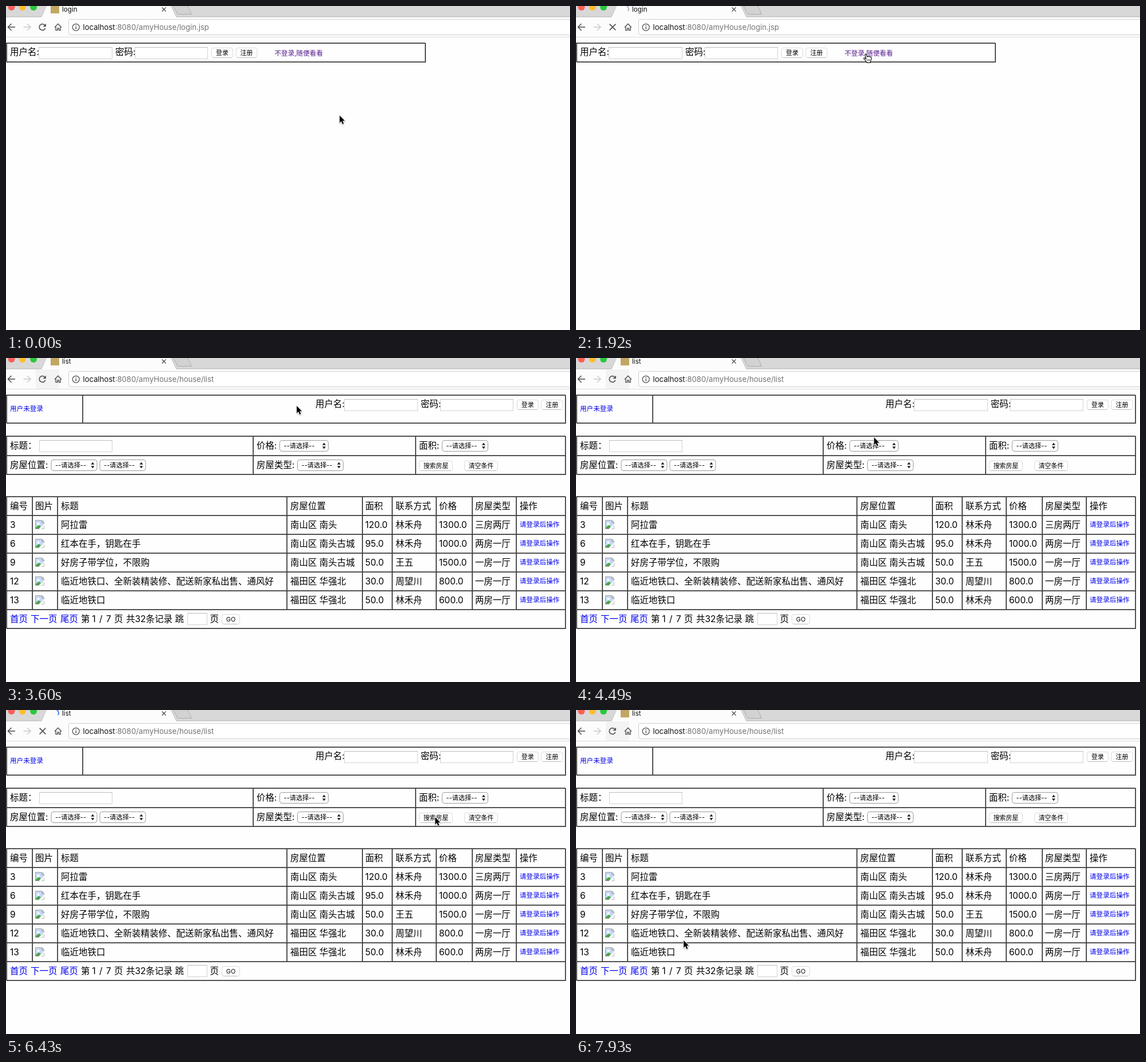
An HTML page with a canvas for the animation above (8 s loop, 986 px wide and 568 px high).

```html
<!DOCTYPE html>
<html lang="zh-CN">
<head>
<meta charset="utf-8">
<title>list</title>
<style>
  html, body { margin: 0; width: 100%; height: 100%; overflow: hidden; background: #fefefe; }
  canvas { display: block; }
</style>
</head>
<body>
<canvas id="stage" width="986" height="568"></canvas>
<script>
const ctx = document.getElementById('stage').getContext('2d');
const LOOP = 8000;
const FONT = 'Inter, "Noto Sans CJK SC", "Noto Sans CJK", sans-serif';
const LINK = '#0000ee', VISITED = '#551a8b';
const EDGE_LIGHT = '#787878', EDGE_DARK = '#2e2e2e';

// Pointer moves: first step, last step, number of steps, goal x, goal y
const START = [583, 191];
const MOVES = [
  [300, 1340, 8, 508, 83],
  [3750, 4640, 7, 524, 152],
  [4940, 5530, 5, 726, 200],
  [5830, 5980, 2, 750, 187],
  [7030, 7930, 7, 188, 403]
];

const COLUMNS = [1, 46, 90, 491, 623, 675, 752, 815, 892, 978];
const CELL_X = [7, 51, 96, 497, 628, 681, 757, 820, 898];
const HEADS = ['编号', '图片', '标题', '房屋位置', '面积', '联系方式', '价格', '房屋类型', '操作'];
const HOUSES = [
  ['3', '', '阿拉雷', '南山区 南头', '120.0', '林禾舟', '1300.0', '三房两厅'],
  ['6', '', '红本在手，钥匙在手', '南山区 南头古城', '95.0', '林禾舟', '1000.0', '两房一厅'],
  ['9', '', '好房子带学位，不限购', '南山区 南头古城', '50.0', '王五', '1500.0', '一房一厅'],
  ['12', '', '临近地铁口、全新装精装修、配送新家私出售、通风好', '福田区 华强北', '30.0', '周望川', '800.0', '一房一厅'],
  ['13', '', '临近地铁口', '福田区 华强北', '50.0', '林禾舟', '600.0', '两房一厅']
];

function text(str, x, y, color = '#000', size = 15.5) {
  ctx.font = size + 'px ' + FONT;
  ctx.fillStyle = color;
  ctx.fillText(str, x, y);
  return ctx.measureText(str).width;
}

function small(str, x, y, color = LINK) {
  text(str, x, y, color, 11.6);
}

function path(points, close) {
  ctx.beginPath();
  points.forEach(([x, y]) => ctx.lineTo(x, y));
  if (close) ctx.closePath();
}

function fill(points, color) {
  path(points, true);
  ctx.fillStyle = color;
  ctx.fill();
}

function stroke(points, color, width, close) {
  path(points, close);
  ctx.strokeStyle = color;
  ctx.lineWidth = width;
  ctx.stroke();
}

function rect(x, y, w, h, color) {
  ctx.fillStyle = color;
  ctx.fillRect(x, y, w, h);
}

function circle(x, y, r, color) {
  ctx.beginPath();
  ctx.arc(x, y, r, 0, 7);
  ctx.fillStyle = color;
  ctx.fill();
}

function arc(x, y, r, from, to, color, width) {
  ctx.beginPath();
  ctx.arc(x, y, r, from, to);
  ctx.strokeStyle = color;
  ctx.lineWidth = width;
  ctx.stroke();
}

function roundBox(x, y, w, h, r, back, edge) {
  ctx.beginPath();
  ctx.roundRect(x + .5, y + .5, w - 1, h - 1, r);
  ctx.fillStyle = back;
  ctx.fill();
  ctx.strokeStyle = edge;
  ctx.lineWidth = 1;
  ctx.stroke();
}

function cross(x, y, r, color, width) {
  stroke([[x - r, y - r], [x + r, y + r]], color, width);
  stroke([[x - r, y + r], [x + r, y - r]], color, width);
}

// Outset table frame against inset cells: a light edge, then a dark one.
// Each line is [x1, y1, x2, y2].
function rules(lines) {
  lines.forEach(([x1, y1, x2, y2]) => rect(x1 - 1, y1 - 1, x2 - x1 + 1, y2 - y1 + 1, EDGE_LIGHT));
  lines.forEach(([x1, y1, x2, y2]) => rect(x1, y1, x2 - x1 + 1, y2 - y1 + 1, EDGE_DARK));
}

function grid(xs, ys, innerBottom = ys[ys.length - 1]) {
  const left = xs[0], right = xs[xs.length - 1];
  const top = ys[0], bottom = ys[ys.length - 1];
  rules([
    ...ys.map(y => [left, y, right, y]),
    ...xs.map(x => [x, top, x, x === left || x === right ? bottom : innerBottom])
  ]);
}

function input(x, y, w, h = 21) {
  roundBox(x, y, w, h, 0, '#fff', '#d2d2d2');
  rect(x, y, w, 1, '#bcbcbc');
}

function button(label, x, y, w, pressed) {
  roundBox(x, y, w, 18, 3.5, pressed ? '#5aa5f7' : '#fff', pressed ? '#3f8ae6' : '#dadada');
  rect(x + 3, y + 17, w - 6, 1, pressed ? '#2f78d2' : '#bdbdbd');
  ctx.textAlign = 'center';
  text(label, x + w / 2, y + 13, '#000', 10.9);
  ctx.textAlign = 'left';
}

function select(x, y, w) {
  roundBox(x, y, w, 20, 4, '#fff', '#9a9a9a');
  text('--请选择--', x + 7.5, y + 14, '#000', 11.2);
  const ax = x + w - 8, ay = y + 10;
  fill([[ax - 3, ay - 1.3], [ax, ay - 5.5], [ax + 3, ay - 1.3]], '#222');
  fill([[ax - 3, ay + 1.3], [ax, ay + 5.5], [ax + 3, ay + 1.3]], '#222');
}

function loginForm(x) {
  text('用户名:', x, 86);
  input(x + 50, 72, 129);
  text('密码:', x + 184, 86);
  input(x + 218, 72, 128);
  button('登录', x + 352, 73, 38);
  button('注册', x + 394.5, 73, 38);
}

function brokenImage(x, y) {
  rect(x + 1, y + 1, 14, 14, '#c6d9f5');
  circle(x + 5.5, y + 6.5, 2.2, '#fff');
  fill([[x + 1, y + 15], [x + 1, y + 13], [x + 6, y + 9], [x + 10, y + 11], [x + 7, y + 15]], '#4fa548');
  fill([[x + 16, y + 7], [x + 7, y + 15.5], [x + 16, y + 16]], '#fff');
  stroke([[x + 15, y + 7], [x + 15.5, y + 4.5], [x + 11.5, y + .5], [x + .5, y + .5],
    [x + .5, y + 15.5], [x + 7, y + 15.5]], '#a0a0a0', 1);
  stroke([[x + 11.5, y + .5], [x + 11.5, y + 4.5], [x + 15.5, y + 4.5]], '#a0a0a0', 1);
  stroke([[x + 15.5, y + 10], [x + 15.5, y + 15.5], [x + 11, y + 15.5]], '#b5b5b5', 1);
}

function chrome(title, urlTail, loading, spin, patch) {
  rect(0, 0, 986, 19, '#d8d8d8');
  rect(0, 19, 986, 36, '#fcfcfc');
  stroke([[0, 19], [62, 19], [71, 0]], '#b2b2b2', 1);
  stroke([[288, 0], [298, 19], [986, 19]], '#b2b2b2', 1);
  fill([[62, 20], [71, 0], [288, 0], [298, 20]], '#fcfcfc');
  const newTab = [[293, 0], [300, 14.5], [324.5, 14.5], [318, 0]];
  fill(newTab, '#d2d2d2');
  stroke(newTab, '#adadad', 1);
  ['#ff5f57', '#ffbd2e', '#28c940'].forEach((c, i) => circle(9.5 + i * 19.3, 2, 6, c));

  if (patch) rect(52, 20, 41, 34, '#f3f3f3');
  rect(0, 54, 986, 1, '#dcdcdc');

  if (loading) arc(85, 5.5, 7, spin - 1.3, spin + .9, loading, 2);
  else rect(78, 0, 15, 13, '#c2a664');
  text(title, 98, 9.5, '#111', 11.7);
  cross(276, 6, 3.4, '#555', 1.4);

  const ink = '#555';
  [[3.5, 1, ink], [43, -1, '#cdcdcd']].forEach(([x, d, c]) => {
    stroke([[x, 37], [x + 12.5 * d, 37]], c, 1.6);
    stroke([[x + 6 * d, 31], [x, 37], [x + 6 * d, 43]], c, 1.6);
  });
  if (loading) {
    cross(64, 37, 5.3, ink, 1.8);
  } else {
    arc(63.7, 37, 5.4, .35, 5.5, ink, 1.7);
    fill([[70, 30.7], [70, 36.3], [64.3, 36.3]], ink);
  }
  stroke([[85, 37.5], [91, 31.3], [97, 37.5]], ink, 1.6);
  stroke([[87, 36.5], [87, 42.5], [90, 42.5], [90, 39], [92.5, 39], [92.5, 42.5], [95.2, 42.5], [95.2, 36.5]], ink, 1.4);

  roundBox(109, 23, 890, 28, 3.5, '#fff', '#cfcfcf');
  arc(122.3, 37.3, 6, 0, 7, ink, 1.3);
  rect(121.6, 36.4, 1.5, 4.2, ink);
  rect(121.6, 33.8, 1.5, 1.5, ink);
  const w = text('localhost', 134.5, 42, '#111', 13.15);
  text(':8080/amyHouse/' + urlTail, 134.5 + w, 42, '#747474', 13.15);
}

function loginPage(active) {
  grid([1, 733], [65, 98]);
  loginForm(7);
  small('不登录,随便看看', 469.5, 86.5, active ? '#ff0000' : VISITED);
}

function listPage(images, pressed) {
  grid([1, 134, 978], [65, 114]);
  small('用户未登录', 7, 93);
  loginForm(541);

  grid([1, 432, 716, 978], [137, 171, 204]);
  text('标题：', 7, 159);
  input(58, 144, 128);
  text('价格:', 438, 159);
  select(478, 144, 86);
  text('面积:', 722, 159);
  select(762, 144, 81);
  text('房屋位置:', 7, 193);
  select(78.5, 178, 81);
  select(163.5, 178, 81);
  text('房屋类型:', 438, 193);
  select(509, 178, 81);
  button('搜索房屋', 722, 180, 59, pressed);
  button('清空条件', 801, 180, 59);

  grid(COLUMNS, Array.from({ length: 8 }, (_, i) => 243 + 33 * i), 441);
  HEADS.forEach((h, i) => text(h, CELL_X[i], 265));
  HOUSES.forEach((house, r) => {
    const y = 298 + 33 * r;
    house.forEach((cell, i) => text(cell, CELL_X[i], y));
    small('请登录后操作', CELL_X[8], y - 2.3);
    if (images) brokenImage(51, y - 14);
  });

  [['首页', 7], ['下一页', 43], ['尾页', 95]].forEach(([s, x]) => text(s, x, 463, LINK));
  [['第', 131], ['1', 150.5], ['/', 163], ['7', 175], ['页', 189], ['共32条记录', 210], ['跳', 295.5], ['页', 356.5]]
    .forEach(([s, x]) => text(s, x, 463));
  input(317, 447, 35);
  button('GO', 377, 449, 32);
}

function pointerAt(t) {
  let [x, y] = START;
  for (const [t0, t1, n, gx, gy] of MOVES) {
    if (t < t0) break;
    const gap = (t1 - t0) / (n - 1);
    const k = Math.min(n, Math.floor((t - t0) / gap + 1e-6) + 1) / n;
    const ease = k * k * (3 - 2 * k);
    x += (gx - x) * ease;
    y += (gy - y) * ease;
  }
  return [x, y];
}

function arrow(x, y) {
  const shape = [[0, 0], [0, 12.8], [2.9, 10.1], [5, 15], [7.2, 14.1], [5.1, 9.3], [9, 9.3]]
    .map(([dx, dy]) => [x + dx + .3, y + dy + 1]);
  ctx.save();
  ctx.lineJoin = 'round';
  ctx.shadowColor = 'rgba(0,0,0,.35)';
  ctx.shadowBlur = 2;
  ctx.shadowOffsetY = 1;
  stroke(shape, '#fff', 1.8, true);
  ctx.restore();
  fill(shape, '#000');
}

function hand(x, y) {
  ctx.save();
  ctx.translate(x - 6, y);
  ctx.lineJoin = 'round';
  ctx.beginPath();
  ctx.moveTo(5.2, 10);
  ctx.lineTo(3.2, 2.6);
  ctx.quadraticCurveTo(3.4, .2, 5.4, 1.4);
  ctx.lineTo(7.2, 6.2);
  ctx.quadraticCurveTo(8.6, 4.2, 9.8, 5.9);
  ctx.quadraticCurveTo(11.2, 4.4, 12.2, 6.5);
  ctx.quadraticCurveTo(14.2, 5.6, 14.4, 8);
  ctx.quadraticCurveTo(14.6, 11.5, 13, 13.4);
  ctx.lineTo(12.8, 16.3);
  ctx.lineTo(6.3, 16.3);
  ctx.quadraticCurveTo(5.2, 13.4, 1.2, 9.4);
  ctx.quadraticCurveTo(.9, 7, 3.3, 8.2);
  ctx.closePath();
  ctx.fillStyle = '#fff';
  ctx.fill();
  ctx.strokeStyle = '#111';
  ctx.lineWidth = 1.2;
  ctx.stroke();
  [7.5, 9.5, 11.5].forEach(fx => stroke([[fx, 10.3], [fx, 13.6]], '#222', .8));
  ctx.restore();
}

function draw(t) {
  const onList = t >= 2100;
  const searching = t >= 6430 && t < 6730;
  const opening = t >= 1920 && t < 2400;
  const color = opening && !onList ? '#a9b4c4' : opening || searching ? '#4a7fe0' : null;
  const spin = opening && !onList || searching && t < 6580 ? -.4 : t < 2250 ? .3 : .9;

  rect(0, 0, 986, 568, '#fefefe');
  chrome(onList ? 'list' : 'login', onList ? 'house/list' : 'login.jsp', color, spin, onList && !color);
  if (onList) listPage(t >= 2250, t >= 6130 && t < 6280);
  else loginPage(t >= 1480 && t < 1630);

  const [x, y] = pointerAt(t);
  if (t < 3600 && y < 90) hand(x, y);
  else arrow(x, y);
}

function tick() {
  draw(performance.now() % LOOP);
  requestAnimationFrame(tick);
}
tick();
</script>
</body>
</html>
```
